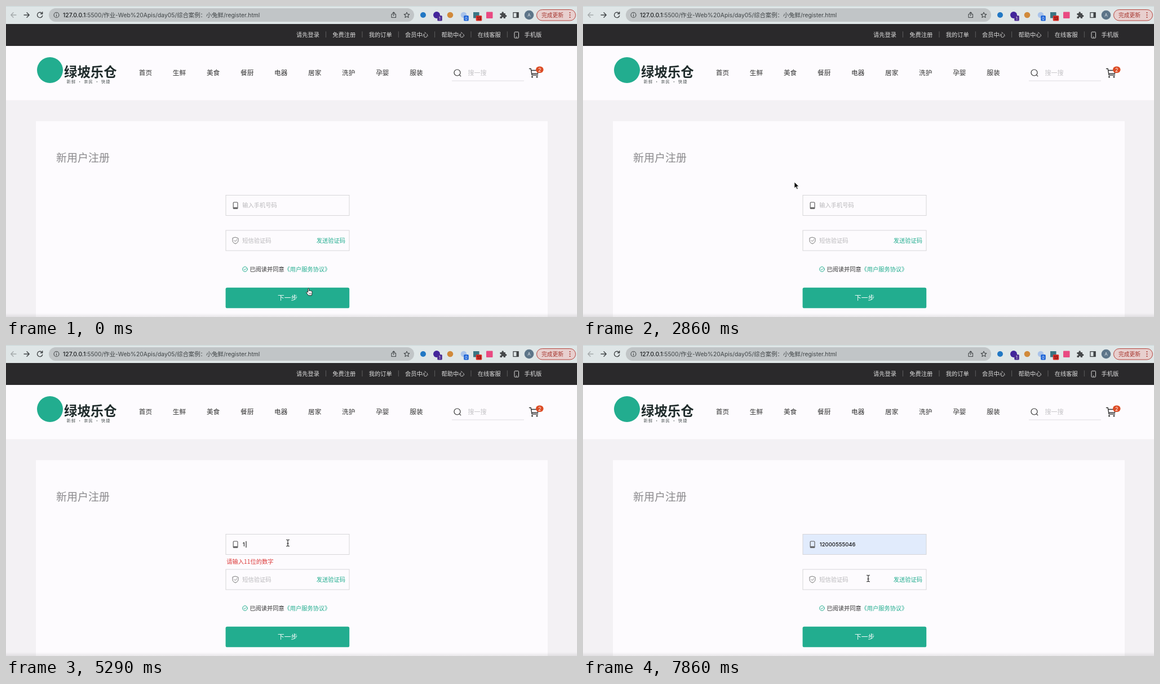
Write an HTML page that moves like this. It is 1013 px wide and 553 px high and loops after 8 s.

```html
<!DOCTYPE html>
<html lang="zh-CN">
<head>
<meta charset="utf-8">
<title>新用户注册</title>
<style>
html, body { margin: 0; width: 100%; height: 100%; overflow: hidden; background: #f3f1f4; }
svg { display: block; width: 100%; height: 100%; }
text { font-family: "Noto Sans CJK SC", "Noto Sans CJK", sans-serif; white-space: pre; }
.ui { font-family: Inter, "Noto Sans CJK SC", sans-serif; }
.line { fill: none; stroke-linecap: round; stroke-linejoin: round; }
</style>
</head>
<body>
<svg id="stage" viewBox="0 0 1013 553" preserveAspectRatio="none">
  <defs>
    <linearGradient id="fade" x2="0" y2="1">
      <stop stop-color="#000" stop-opacity="0"/>
      <stop offset="1" stop-color="#000" stop-opacity=".08"/>
    </linearGradient>
    <filter id="shadow" x="-10%" y="-10%" width="120%" height="130%">
      <feDropShadow dx="0" dy="1" stdDeviation="1.5" flood-opacity=".35"/>
    </filter>
  </defs>

  <!-- browser toolbar -->
  <rect width="1013" height="32" fill="#dfe6e7"/>
  <rect width="1013" height="1" fill="#c9d8d8"/>
  <circle id="reloadHover" cx="60" cy="16" r="10" fill="#c6cdce"/>
  <g class="line" stroke-width="1.4">
    <path d="M18 16H9m4-4.2L8.800 16l4.200 4.200" stroke="#a4a9ab"/>
    <path d="M32 16h9m-4-4.200L41.200 16 37 20.200" stroke="#3f4345"/>
    <path d="M64.200 13.500A4.700 4.700 0 1 0 64.700 17.200M64.700 10.800v3.200h-3.200" stroke="#3f4345"/>
  </g>
  <rect x="76" y="4" width="648" height="24" rx="12" fill="#c1c5c7"/>
  <g class="line" stroke="#44484a" stroke-width="1.1">
    <circle cx="89.500" cy="16" r="4.500"/>
    <path d="M89.500 15.800v2.400m0-4.600v.1"/>
    <path d="M686 14.500h-2v6h7.500v-6h-2M687.750 17.500v-6.500m-2 2 2-2 2 2"/>
    <path d="m711 11.200 1.400 3.200 3.500.3-2.600 2.300.8 3.500-3.100-1.900-3.100 1.900.8-3.500-2.600-2.300 3.500-.3z"/>
  </g>
  <circle cx="740" cy="16" r="5" fill="#2278c4"/>
  <circle cx="764" cy="16" r="6" fill="#43259b"/>
  <circle cx="788" cy="16" r="5.300" fill="#d18a3b"/>
  <circle cx="812" cy="16" r="5.300" fill="#a9c3ea"/>
  <rect x="829" y="11" width="10.500" height="10.500" fill="#3b7583"/>
  <rect x="852" y="10.500" width="11.500" height="11.500" rx="1" fill="#e94a82"/>
  <path d="M876.500 13h3v-1a1.700 1.700 0 0 1 3.400 0v1h3v3h.8a1.700 1.700 0 0 1 0 3.400h-.8v2.600h-3.100v-.8a1.400 1.400 0 0 0-2.800 0v.8h-3.500v-3.200h.8a1.400 1.400 0 0 0 0-2.800h-.8z" fill="#46494b"/>
  <rect x="900" y="11.700" width="9" height="8.800" fill="none" stroke="#3f4345" stroke-width="1.300"/>
  <rect x="905.500" y="11.500" width="4" height="9" fill="#3f4345"/>
  <circle cx="928" cy="16" r="8.300" fill="#5d7589"/>
  <rect x="941.500" y="6.500" width="69" height="19.500" rx="9.750" fill="#e8cfce" stroke="#b5433c"/>
  <g fill="#a5332c"><circle cx="1000.500" cy="12" r="1.100"/><circle cx="1000.500" cy="16" r="1.100"/><circle cx="1000.500" cy="20" r="1.100"/></g>

  <!-- page header -->
  <rect y="32" width="1013" height="39" fill="#2a292b"/>
  <rect y="71" width="1013" height="96.600" fill="#fdfbfe"/>
  <rect x="902" y="46.200" width="7.500" height="10.800" rx="1.200" fill="none" stroke="#dcdcdc"/>
  <path d="M904.800 55h2" stroke="#dcdcdc"/>
  <circle cx="78" cy="114" r="23" fill="#22ad8f"/>
  <g class="line" stroke="#333" stroke-width="1.200">
    <circle cx="800.500" cy="118.500" r="5.500"/>
    <path d="m804.600 122.600 2.200 2.200"/>
    <path d="M928.500 111.500h2.700l1.800 11.300h10.500M932 114.500h11.500v5.800h-10.800" stroke-width="1.400"/>
  </g>
  <circle cx="933.500" cy="126" r="1.500" fill="#333"/>
  <circle cx="942" cy="126" r="1.500" fill="#333"/>
  <rect x="940" y="107.500" width="13.500" height="11.500" rx="5.750" fill="#dc4b24"/>
  <path d="M791 133h128" stroke="#dedce0"/>

  <!-- form -->
  <rect x="53" y="204.800" width="908" height="348.200" fill="#fdfbfe"/>
  <g stroke="#d3d2d5" stroke-width=".9" fill="#fdfbfe">
    <rect id="phoneBox" x="390" y="336.500" width="219" height="36"/>
    <rect x="390" y="399" width="219" height="36"/>
  </g>
  <rect x="403.200" y="349" width="7.800" height="11.500" rx="1.300" fill="none" stroke="#555" stroke-width="1.100"/>
  <path d="M403.500 358.800h7.200" stroke="#555" stroke-width="1.800"/>
  <g class="line" stroke="#777">
    <path d="m407 411.300 5 1.700v4.200c0 2.800-2.300 4.500-5 5.700-2.700-1.200-5-2.900-5-5.700V413z"/>
    <path d="m404.700 416.800 1.800 1.800 3.200-3.200"/>
  </g>
  <g class="line" stroke="#22ad8f">
    <circle cx="424" cy="468" r="4.300"/>
    <path d="m422 468 1.500 1.500 2.700-2.800"/>
  </g>
  <rect x="389.600" y="500.700" width="219.600" height="36.600" rx="2.900" fill="#22ad8f"/>

  <g id="labels"></g>

  <text id="phoneValue" class="ui" x="419.800" y="358.200" fill="#111" font-weight="500"></text>
  <path id="caret" d="M426 348.800v11.500" stroke="#000"/>

  <g id="dropdown">
    <path d="M466 380h6l5-5.500 5 5.500h91q3.500 0 3.500 3.500v51q0 3.500-3.500 3.500h-107q-3.500 0-3.500-3.500v-51q0-3.500 3.500-3.500z" fill="#fdfbfe" filter="url(#shadow)"/>
    <rect id="rowHover" x="462.500" y="382" width="114" height="26.500" fill="#e1e0e2"/>
    <g id="options"></g>
  </g>

  <rect y="546" width="1013" height="7" fill="url(#fade)"/>

  <g id="arrow"><path d="M0 0v11l2.600-2.400 1.800 4.100 1.900-.8-1.800-4h3.600z" fill="#000" stroke="#fff" stroke-width=".8"/></g>
  <g id="hand"><path d="M-2.300 1.200v-6q0-1.200 1-1.200t1 1.200v3.300q1-.8 1.800.1 1.100-.7 1.800.3 1.600-.5 1.800 1.100v2.500q0 2-1.100 4.300h-5.200Q-3.200 4.500-4.900 2q-.7-1.200.2-1.500.9-.2 2.400.7z" fill="#fff" stroke="#222" stroke-width="1" stroke-linejoin="round"/><path d="M-.2 2v2.600M1.500 2v2.600M3.200 2v2.600" stroke="#222" stroke-width=".6"/></g>
  <g id="beam"><path d="M-2.500-5.800q2.500 0 2.500 1.500 0-1.500 2.500-1.500M-2.500 5.800q2.500 0 2.500-1.500 0 1.500 2.500 1.500M0-4.500v9M-1.300 1h2.600" class="line" stroke="#222" stroke-width="1.100"/></g>
</svg>
<script>
const $ = id => document.getElementById(id);
const PHONE = '12000555046';
const GREEN = '#22ad8f', RED = '#dc3838', GREY = '#b9b8bb';

function add(tag, attrs, parent = $('labels')) {
  const el = document.createElementNS('http://www.w3.org/2000/svg', tag);
  for (const key in attrs) el.setAttribute(key, attrs[key]);
  parent.append(el);
  return el;
}

// y is the vertical middle of the glyphs
function label(x, y, size, fill, text, attrs, parent) {
  const el = add('text', { x, y: y + size * 0.38, 'font-size': size, fill, ...attrs }, parent);
  el.textContent = text;
  return el;
}
const ui = { class: 'ui' };
const middle = { class: 'ui', 'text-anchor': 'middle' };

const address = label(101, 16, 10.35, '#3f4446', '', ui);
add('tspan', { fill: '#1d2022', 'font-weight': 500 }, address).textContent = '127.0.0.1';
address.append(':5500/作业-Web%20Apis/day05/综合案例：小兔鲜/register.html');
label(950, 16, 9.75, '#a5332c', '完成更新', { 'font-weight': 500 });
label(928, 16, 8, '#e4ebf0', 'A', middle);

function badge(x, width, fill, color, text) {
  add('rect', { x: x - width / 2, y: 17, width, height: 9.5, rx: 1.5, fill });
  label(x, 22, 7, color, text, middle);
}
badge(769.5, 8.5, '#4b2a91', '#fff', '1');
badge(816.5, 8.5, '#1b62d6', '#fff', '0');
badge(839, 10.5, '#d92e27', '#3a0a08', '13');

['请先登录', '免费注册', '我的订单', '会员中心', '帮助中心', '在线客服'].forEach((text, i) => {
  label(515 + i * 64.35, 51.5, 10.25, '#dcdcdc', text);
  label(567.6 + i * 64.35, 51, 9, '#777', '|', middle);
});
label(919.5, 51.5, 10.25, '#dcdcdc', '手机版');

label(103, 117, 23.4, '#1f2b2b', '绿坡乐仓', { 'font-weight': 900 });
label(107.5, 134.5, 7.3, '#4a5252', '新鲜 · 亲民 · 快捷', { 'letter-spacing': 1.1 });
['首页', '生鲜', '美食', '餐厨', '电器', '居家', '洗护', '孕婴', '服装'].forEach((text, i) =>
  label(235.8 + i * 60.05, 119, 11.7, '#333', text));
label(819.5, 119, 11, '#c4c3c6', '搜一搜');
label(946.8, 113.3, 9, '#fff', '2', middle);

label(89, 270, 19.02, '#8b8a8d', '新用户注册');
const phoneHint = label(419.3, 354.5, 10.25, GREY, '输入手机号码');
label(419.3, 416.7, 10.25, GREY, '短信验证码');
label(550.8, 417, 10.25, GREEN, '发送验证码');
const phoneError = label(391.3, 385.5, 10.25, RED, '请输入11位的数字');
const codeError = label(391.3, 448, 10.25, RED, '请输入6位的数字');
label(432.3, 468, 10.25, '#333', '已阅读并同意');
label(493.5, 468, 10.25, GREEN, '《用户服务协议》');
label(482, 518.7, 11.7, '#fff', '下一步');
label(471, 395.5, 9.5, '#111', PHONE, ui, $('options'));
label(471, 422, 9.5, '#111', '12', ui, $('options'));

// pointer path: step, x, y
const path = [
  [0, 538, 508], [4, 538, 508], [7, 323, 391], [8, 150, 150], [9, 60, 15], [17, 60, 15],
  [20, 375, 313], [24, 470, 352], [28, 482, 352], [31, 492, 309], [33, 640, 328],
  [35, 645, 330], [37, 500, 352], [39, 505, 355], [41, 533, 387], [43, 535, 388],
  [46, 664, 372], [48, 667, 370], [49, 667, 370], [53, 506, 415], [56, 506, 415]
];
const STEPS = 56, LOOP = 8000;

function pointerAt(step) {
  const i = path.findIndex(p => p[0] > step);
  const [s0, x0, y0] = path[i - 1], [s1, x1, y1] = path[i];
  const k = (step - s0) / (s1 - s0);
  return [x0 + (x1 - x0) * k, y0 + (y1 - y0) * k];
}

const show = (el, on) => { el.style.display = on ? '' : 'none'; };
const within = (v, from, to) => v >= from && v < to;

function draw(step) {
  const [x, y] = pointerAt(step);
  const overField = within(x, 390, 609) && (within(y, 337, 373) || within(y, 399, 435));
  const kind = step < 8 ? 'hand' : overField ? 'beam' : 'arrow';
  for (const id of ['arrow', 'hand', 'beam']) {
    show($(id), id === kind);
    $(id).setAttribute('transform', `translate(${x} ${y})`);
  }
  show($('reloadHover'), Math.hypot(x - 60, y - 16) < 11);

  const typed = within(step, 26, 40), preview = within(step, 40, 43), filled = step >= 40;
  $('phoneValue').textContent = typed ? '1' : filled ? PHONE : '';
  $('phoneValue').setAttribute('font-size', preview ? 9.1 : 9.5);
  $('phoneBox').setAttribute('fill', filled ? '#e1ebfc' : '#fdfbfe');
  show(phoneHint, !typed && !filled);
  show($('caret'), within(step, 26, 33) || within(step, 37, 40));

  show($('dropdown'), within(step, 26, 33) || within(step, 38, 43));
  show($('rowHover'), preview);
  show(phoneError, within(step, 2, 12) || within(step, 34, 46));
  show(codeError, within(step, 2, 12));
}

const start = performance.now();
function tick() {
  const time = (performance.now() - start) % LOOP;
  // small lead absorbs the rounding of step times to 10 ms
  draw(Math.floor(time * STEPS / LOOP + 0.04) % STEPS);
  requestAnimationFrame(tick);
}
tick();
</script>
</body>
</html>
```
